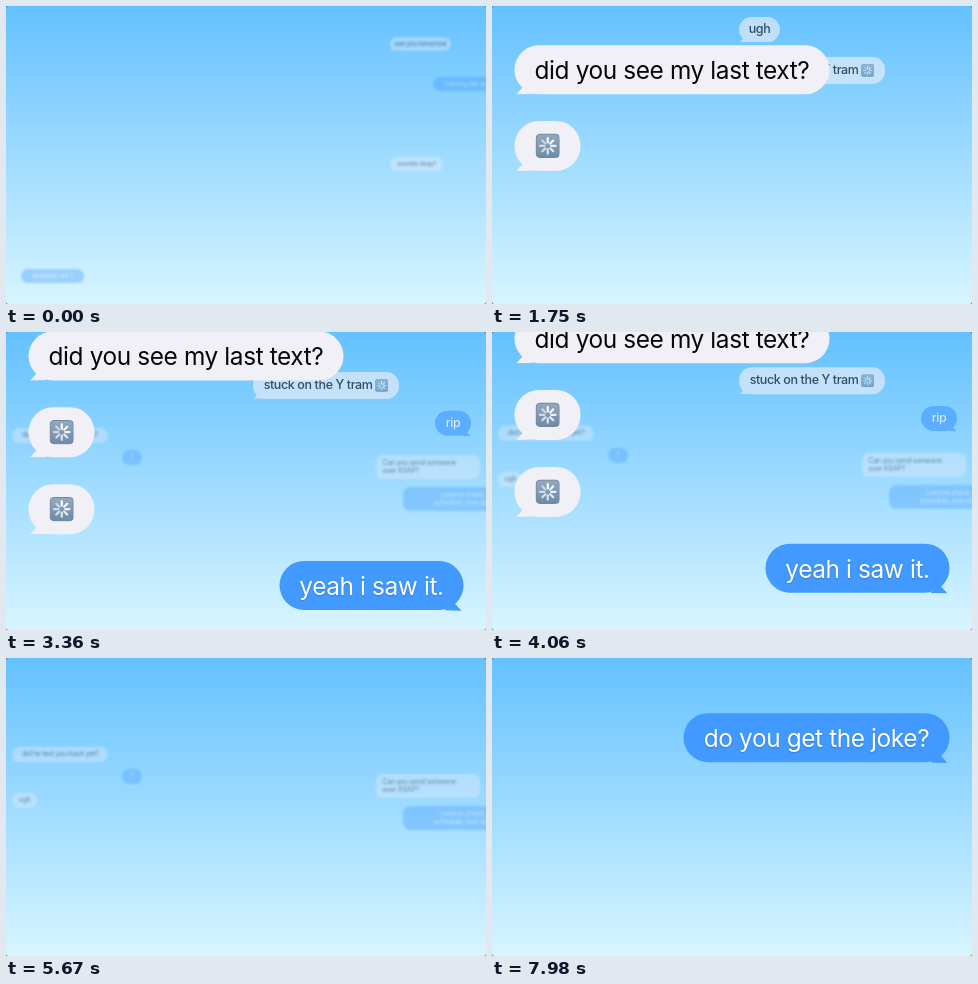
An HTML page that plays this animation: 480 by 298 pixels, repeating every 8000 ms.

```html
<!DOCTYPE html>
<html lang="en">
<head>
<meta charset="utf-8">
<title>Text bubbles</title>
<style>
  html, body { margin: 0; width: 100%; height: 100%; overflow: hidden; background: #456; }
  #stage {
    position: relative; width: 480px; height: 298px; overflow: hidden; border-radius: 2px;
    background: linear-gradient(#64c1ff, #d8f5ff);
    font-family: Inter, Roboto, sans-serif; letter-spacing: -.024em;
  }
  .bubble {
    position: absolute; left: 0; top: 0; box-sizing: border-box; min-height: 2.02em;
    display: flex; align-items: center; justify-content: center; gap: .2em;
    border-radius: 1.01em; background: #f1f0f7; color: #060608;
    white-space: pre; line-height: 1.15;
  }
  .bubble::after {
    content: ""; position: absolute; left: .06em; bottom: 0; width: .7em; height: .36em;
    background: inherit; clip-path: polygon(0 100%, 48% 0, 100% 94%);
  }
  .blue { background: #4299ff; color: #fff; text-align: center; text-shadow: 0 .04em .06em #1c4f9966; }
  .blue::after { left: auto; right: .06em; transform: scaleX(-1); }
  .bubble svg { width: 1.06em; height: 1.06em; }
</style>
</head>
<body>
<div id="stage"></div>
<script>
const LOOP = 8000;
const stage = document.getElementById('stage');

const rays = Array.from({ length: 8 }, (_, i) =>
  `<path d="M0-3.6V-8.2" transform="rotate(${i * 45})" opacity="${1 - i * .06}"/>`).join('');
const icon = `<svg viewBox="-13 -13 26 26">
  <linearGradient id="steel" x2="0" y2="1"><stop stop-color="#93a9bf"/><stop offset="1" stop-color="#6f8aa6"/></linearGradient>
  <rect x="-12.3" y="-12.3" width="24.6" height="24.6" rx="4" fill="url(#steel)" stroke="#6c839b"/>
  <g stroke="#fff" stroke-width="2.3" stroke-linecap="round">${rays}</g></svg>`;

// Depth layers: drift in px/ms, resting blur and opacity, entrance and exit.
const layers = {
  past: { size: 6.8, speed: .003, blur: 1, alpha: .5, rise: 0, enter: 1, exit: [-100, 300] },
  far: { size: 7.3, speed: .003, blur: .8, alpha: .34, rise: 2, enter: 500, exit: [6280, 6790] },
  mid: { size: 12.5, speed: .0068, blur: .6, alpha: .62, rise: 4, enter: 500, exit: [5110, 5600] },
  near: { size: 24.4, speed: .0247, blur: 0, alpha: 1, rise: 28, enter: 450, exit: [5110, 5600] },
  last: { size: 24.4, speed: .0247, blur: 0, alpha: 1, rise: 28, enter: 450, exit: [9000, 9500] }
};

// layer, x, y at time zero, width, start, colour, content
const messages = [
  ['past', 384, 31, 61, -2000, '', 'see you tomorrow'],
  ['past', 427, 71, 74, -2000, 'blue', 'running late again'],
  ['past', 384, 151, 53, -2000, '', 'sounds okay?'],
  ['past', 15, 263, 63, -2000, 'blue', 'probably not ?'],
  ['far', 6, 106, 96, 2150, '', 'did he text you back yet?'],
  ['far', 370, 133, 104, 1950, '', 'Can you send someone\nover ASAP?'],
  ['far', 116, 128, 20, 2700, 'blue', '?'],
  ['far', 397, 165, 118, 2800, 'blue', 'Lemme check\nschedule, one sec'],
  ['far', 6, 152, 25, 3550, '', 'ugh'],
  ['mid', 247, 23, 41, 620, '', 'ugh'],
  ['mid', 247, 62.8, 146, 1150, '', 'stuck on the Y tram' + icon],
  ['mid', 429, 101.5, 36, 1850, 'blue', 'rip'],
  ['near', 22.5, 82.5, 315, 400, '', 'did you see my last text?'],
  ['near', 22.5, 158.2, 66, 1130, '', icon],
  ['near', 22.5, 235.2, 66, 1900, '', icon],
  ['near', 273.5, 312, 184, 2700, 'blue', 'yeah i saw it.'],
  ['last', 191.5, 252.3, 266, 7400, 'blue', 'do you get the joke?']
];

const clamp = v => Math.min(1, Math.max(0, v));
const easeOut = p => 1 - (1 - p) ** 3;

const bubbles = messages.map(([name, x, y, width, start, colour, content]) => {
  const layer = layers[name];
  const el = document.createElement('div');
  el.className = `bubble ${colour}`;
  el.innerHTML = content;
  el.style.width = width + 'px';
  el.style.fontSize = layer.size + 'px';
  if (name === 'mid') el.style.fontWeight = 500;
  if (content.includes('\n')) {
    el.style.padding = '.5em .85em';
    if (!colour) el.style.justifyContent = 'flex-start';
  }
  stage.append(el);
  return { el, layer, x, y, start };
});

function draw(time) {
  for (const { el, layer, x, y, start } of bubbles) {
    const { speed, blur, alpha, rise, enter, exit: [from, to] } = layer;
    const shown = clamp((time - start) / enter);
    const gone = clamp((time - from) / (to - from));
    const opacity = clamp(shown * (rise > 20 ? 2 : 1)) * (1 - gone) * alpha;
    el.style.visibility = opacity ? 'visible' : 'hidden';
    if (!opacity) continue;
    const top = y - speed * time + rise * (1 - easeOut(shown));
    const soft = blur + (rise > 20 ? 0 : 1.2 * (1 - shown)) + gone;
    el.style.opacity = opacity;
    el.style.transform = `translate(${x}px, ${top}px)`;
    el.style.filter = soft ? `blur(${soft}px)` : 'none';
  }
}

function tick() {
  draw(performance.now() % LOOP);
  requestAnimationFrame(tick);
}
tick();
</script>
</body>
</html>
```
